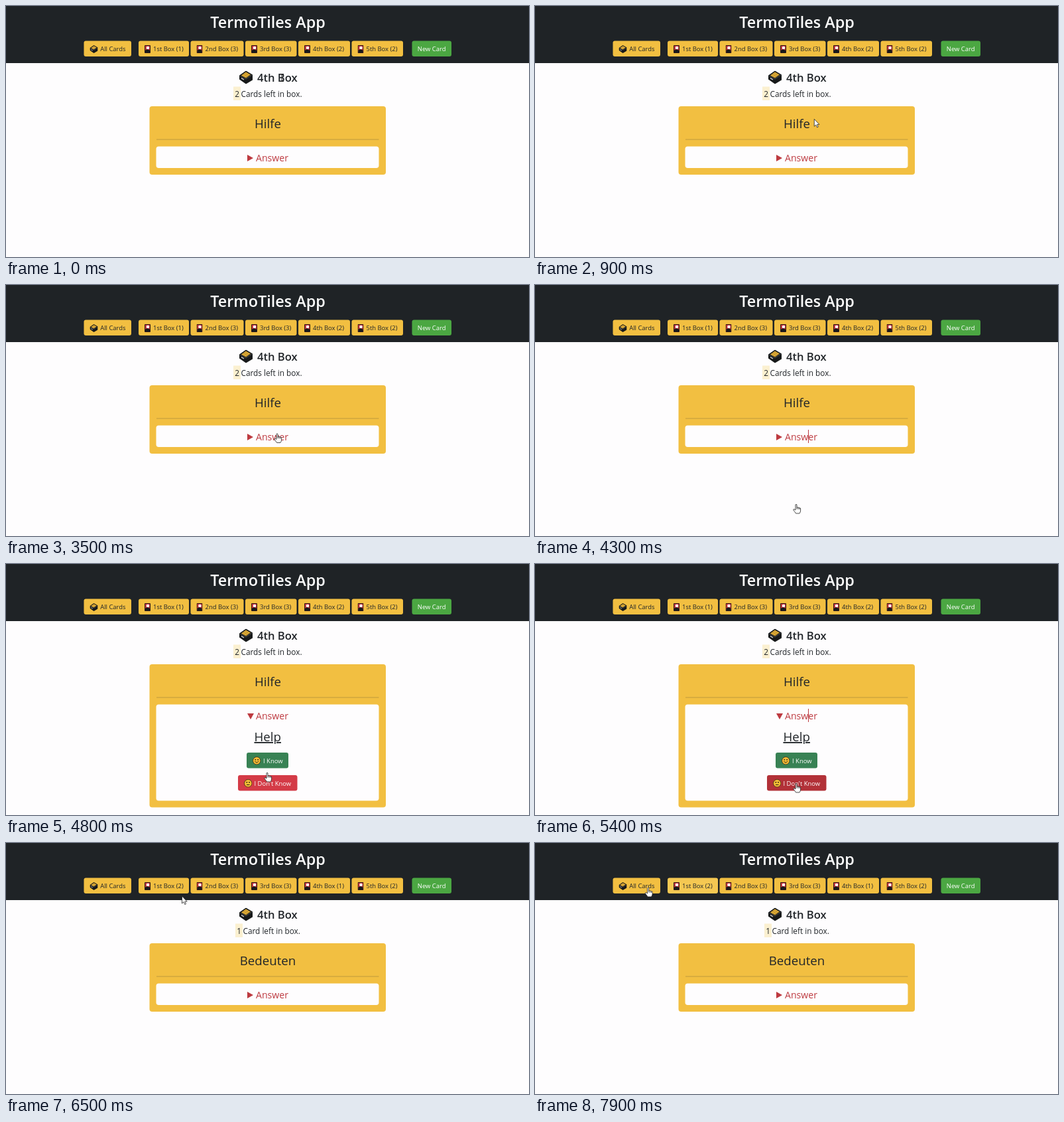
An HTML page for the animation above (8000 ms loop, 789 by 378 pixels).

```html
<!DOCTYPE html>
<html lang="en">
<head>
<meta charset="utf-8">
<style>
  html, body { margin: 0; width: 100%; height: 100%; overflow: hidden; background: #fefdfe; }
  svg { display: block; width: 789px; height: 378px; font-family: "Open Sans", "Noto Sans", sans-serif; fill: #212529; }
  .mid { text-anchor: middle; }
  .small { font-size: 9.45px; }
  .light { fill: #fff; }
  .word { font-size: 18.7px; }
  .body { font-size: 11.8px; }
  .semi { font-weight: 600; }
  .red { fill: #bd3a40; }
</style>
</head>
<body>
<svg viewBox="0 0 789 378">
  <defs>
    <symbol id="file" viewBox="0 0 20 20">
      <path d="M0 7 10 0 20 6V14L10 20 0 13Z" fill="#17191a"/>
      <path d="M3 7 10 2 17 6 10 11Z" fill="#f3bd3c"/>
      <path d="M5 7 12 3M7 8.5 14 4.5M9 10 16 6" stroke="#8b6620" stroke-width=".8"/>
      <path d="M0 7 10 12.5 20 6" fill="none" stroke="#45484a" stroke-width="1"/>
      <path d="M3 11.2 7 13.5" stroke="#d8d8d8" stroke-width="1.4"/>
    </symbol>
    <symbol id="deck" viewBox="0 0 9 12">
      <rect width="9" height="12" rx="1" fill="#2b1a1c"/>
      <rect x="1" y="1" width="7" height="10" fill="#c9343a"/>
      <circle cx="5" cy="4" r="2.3" fill="#fff"/>
      <path d="M1 11V8Q4 4.5 8 8V11Z" fill="#17191a"/>
    </symbol>
    <symbol id="face" viewBox="0 0 12 12">
      <circle cx="6" cy="6" r="5.5" fill="#f6bd35" stroke="#3a2c14" stroke-width=".8"/>
      <path d="M3.3 4.6H5M7 4.6H8.7" stroke="#2b2117" stroke-width="1.3"/>
    </symbol>
  </defs>

  <path d="M0 0H789V86H0Z" fill="#1f2326"/>
  <text x="395" y="32.5" class="mid semi light" font-size="23.4">TermoTiles App</text>
  <g id="nav"></g>

  <use href="#file" x="352" y="97.5" width="20" height="20"/>
  <text x="379" y="114" class="semi" font-size="16.6">4th Box</text>
  <g id="left">
    <rect x="343" y="121.5" width="11" height="20.5" fill="#fbf0d0"/>
    <text id="count" x="348.5" y="136.5" class="mid body"></text>
    <text id="label" x="354.5" y="136.5" class="body"></text>
  </g>

  <rect id="card" x="216.5" y="151" width="356.5" rx="4" fill="#f2bf41"/>
  <text id="question" x="395" y="184" class="mid word"></text>
  <path d="M227 201H562.5" stroke="#bf9a3d"/>
  <rect id="panel" x="226.5" y="211.5" width="336" rx="4" fill="#fefdfe"/>
  <path id="marker" class="red"/>
  <text x="377" y="234" class="red" font-size="14.1">Answer</text>
  <g id="answer">
    <text x="394.7" y="267" class="mid word" text-decoration="underline">Help</text>
    <rect id="know" x="363" y="284" width="63" height="23.5" rx="3"/>
    <use href="#face" x="372" y="290" width="12.5" height="12.5"/>
    <path d="M375.5 297Q378.3 301 381 297" fill="none" stroke="#2b2117"/>
    <text x="388" y="299.8" class="small light">I Know</text>
    <rect id="dont" x="350" y="318" width="89.5" height="23.5" rx="3"/>
    <use href="#face" x="359" y="324" width="12.5" height="12.5"/>
    <path d="M363 332.5H367.5" stroke="#2b2117"/>
    <text x="374.5" y="333.8" class="small light">I Don't Know</text>
  </g>
  <path id="caret" stroke-width="1"/>

  <g id="cursor" stroke="#222" stroke-width=".8" stroke-linejoin="round">
    <path id="arrow" fill="#fff" d="M0 0V11L2.5 8.7 4.3 12.6 6 11.8 4.3 8.1H7.7Z"/>
    <path id="hand" fill="#fff" d="M-1 1Q0 -.8 1 1V5Q2 4.2 3 5.2 4.2 4.6 5 5.8 6.6 5.4 6.6 7V10Q6.5 12 5 14H-.5Q-2 11.5-4 9.2-4.6 7.5-3 7.6L-1 9Z M1 5V7.5M3 5.2V7.8M5 5.8V8"/>
    <path id="beam" fill="none" stroke-width="1" d="M-3-5.5H-1L0-5 1-5.5H3M0-5V5M-3 5.5H-1L0 5 1 5.5H3"/>
  </g>
</svg>
<script>
const $ = id => document.getElementById(id);
const set = (id, attrs) => { for (const k in attrs) $(id).setAttribute(k, attrs[k]); };
const show = (id, on) => set(id, { display: on ? 'inline' : 'none' });

// left edge, width, label
const buttons = [
  [117.5, 71.5, 'All Cards'], [200, 76, '1st Box'], [278.5, 80, '2nd Box'],
  [361, 77.5, '3rd Box'], [441, 78, '4th Box'], [521.5, 77.5, '5th Box'], [612.5, 59.5, 'New Card']
];
$('nav').innerHTML = buttons.map(([x, w, label], i) => {
  const isNew = i === 6;
  const icon = isNew ? '' : i ? `<use href="#deck" x="${x + 9}" y="59" width="9" height="12"/>`
    : `<use href="#file" x="${x + 9}" y="59" width="12" height="12"/>`;
  return `<rect id="btn${i}" x="${x}" y="52.5" width="${w}" height="23.5" rx="3" fill="${isNew ? '#4ba742' : '#f2bf41'}"/>${icon}
    <text id="text${i}" x="${x + (isNew ? 8.3 : i ? 22 : 24.7)}" y="68.4" class="small${isNew ? ' light' : ''}">${label}</text>`;
}).join('');

// time, x, y, pointer shape from then on
const path = [
  [0, 416, 108, 'beam'], [200, 416, 108, 'beam'], [600, 428, 134, 'arrow'], [1000, 420, 177, 'beam'],
  [1100, 420, 177, 'beam'], [1700, 420, 177, 'arrow'], [1800, 467, 159, 'arrow'], [2100, 474, 166, 'arrow'],
  [2300, 474, 166, 'arrow'], [2800, 420, 218, 'hand'], [3100, 409, 223.5, 'hand'], [3800, 409, 223.5, 'hand'],
  [4300, 394, 330, 'hand'], [4600, 394, 330, 'hand'], [5000, 394, 298, 'hand'], [5300, 394, 330, 'hand'],
  [5500, 394, 330, 'hand'], [5700, 380, 290, 'arrow'], [6400, 265.5, 80, 'arrow'], [6700, 265.5, 80, 'arrow'],
  [7000, 252, 66, 'hand'], [7300, 250, 66, 'hand'], [7900, 170.5, 67, 'hand'], [8000, 170.5, 67, 'hand']
];
const wordCaret = [[1100, 1500], [1800, 2400], [2900, 3500]];
const answerCaret = [[3800, 4400], [4900, 5600]];
const within = (t, spans) => spans.some(([a, b]) => t >= a && t < b);

function pointer(t) {
  const i = path.findIndex(p => p[0] > t) - 1;
  const [t0, x0, y0, shape] = path[i], [t1, x1, y1] = path[i + 1];
  const u = (t - t0) / (t1 - t0), e = u * u * (3 - 2 * u);
  return { x: x0 + (x1 - x0) * e, y: y0 + (y1 - y0) * e, shape };
}

function draw(t) {
  const open = t >= 4400 && t < 5600, moved = t >= 5600;
  const { x, y, shape } = pointer(t);

  [1, 3, 3, 2, 2].forEach((n, i) => {
    const count = n + (moved ? (i === 0) - (i === 3) : 0);
    $('text' + (i + 1)).textContent = `${buttons[i + 1][2]} (${count})`;
  });
  set('btn1', { fill: t >= 7000 ? '#f5c852' : '#f2bf41' });
  set('left', { transform: `translate(${moved ? 3 : 0})` });
  $('count').textContent = moved ? 1 : 2;
  $('label').textContent = `Card${moved ? '' : 's'} left in box.`;
  $('question').textContent = moved ? 'Bedeuten' : 'Hilfe';

  set('card', { height: open ? 215.5 : 103 });
  set('panel', { height: open ? 145 : 32.5 });
  set('marker', { d: open ? 'M364 225H374L369 234Z' : 'M364 224V234L373 229Z' });
  show('answer', open);
  set('know', { fill: y < 308 ? '#2a7048' : '#388254' });
  set('dont', { fill: y > 317 ? '#b23138' : '#d43b47' });

  const onWord = within(t, wordCaret);
  show('caret', onWord || within(t, answerCaret));
  set('caret', { d: onWord ? 'M415.5 163V189' : 'M412.5 218V238', stroke: onWord ? '#212529' : '#bd3a40' });

  set('cursor', { transform: `translate(${x} ${y})` });
  for (const s of ['arrow', 'hand', 'beam']) show(s, s === shape);
}

function tick() {
  draw(Math.floor(performance.now() % 8000 / 100) * 100);
  requestAnimationFrame(tick);
}
tick();
</script>
</body>
</html>
```
